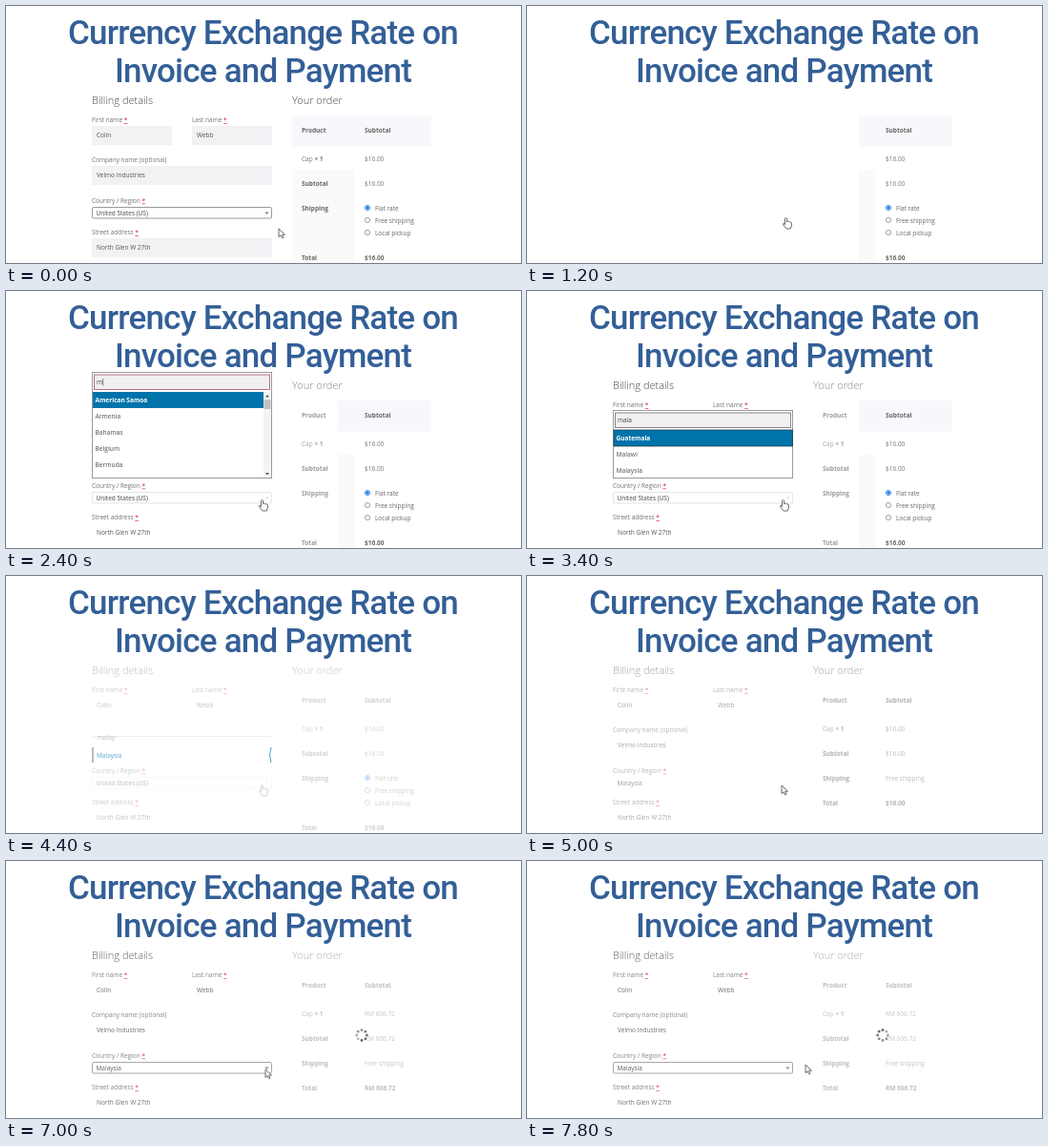
Write an HTML page that moves like this. It is 540 px wide and 270 px high and loops after 8000 ms.

```html
<!DOCTYPE html>
<html lang="en">
<head>
<meta charset="utf-8">
<title>Currency Exchange Rate on Invoice and Payment</title>
<style>
html, body { margin: 0; height: 100%; overflow: hidden; background: #fff; }
svg { display: block; width: 540px; height: 270px; font: 6.5px "Open Sans", "Noto Sans", sans-serif; }
.title { font: 500 35px Roboto, sans-serif; letter-spacing: -.8px; fill: #335f97; text-anchor: middle; }
.head { font-size: 11px; font-weight: 300; }
</style>
</head>
<body>
<svg viewBox="0 0 540 270">
  <g id="scene"></g>
  <text class="title" x="269.5" y="39.5">Currency Exchange Rate on</text>
  <text class="title" x="269.5" y="80">Invoice and Payment</text>
</svg>
<script>
const LOOP = 8000, STEP = 200;
const scene = document.getElementById('scene');

const text = (x, y, s, fill = '#555', more = '') =>
  `<text x="${x}" y="${y}" fill="${fill}" ${more}>${s}</text>`;
const rect = (x, y, w, h, fill, more = '') =>
  `<rect x="${x}" y="${y}" width="${w}" height="${h}" fill="${fill}" ${more}/>`;
const group = (opacity, s) => opacity ? `<g opacity="${opacity}">${s}</g>` : '';
const bold = 'font-weight="700"';
const required = ' <tspan fill="#d22" text-decoration="underline">*</tspan>';

// Each entry overrides the defaults from its time on.
const base = {
  form: 1, fill: 0, edge: 0.25, country: 'United States (US)',
  order: 1, names: 1, shade: 348, local: false, price: '$16.00',
  list: null, busy: false, hand: true, x: 265, y: 219
};
const search = (top, query, rows, mark = 0) => ({ top, query, rows, mark });
const open = { names: 0.65 };
const single = search(160, 'malay', ['Malaysia']);
const faint = { form: 0.35, order: 0.3, shade: 0, edge: 0.2, list: { ...single, ghost: true } };
const chosen = { form: 0.5, order: 0.5, shade: 0, edge: 0, country: 'Malaysia', local: true, hand: false, x: 267, y: 220 };
const loading = { ...chosen, form: 0.85, edge: 1, order: 0.42, price: 'RM 606.72', busy: true };
const timeline = [
  [0, { fill: 1, edge: 1, shade: 300, hand: false, x: 286, y: 234 }],
  [1000, { form: 0, names: 0, hand: false, x: 279, y: 230 }],
  [1200, { form: 0, names: 0, x: 268, y: 222 }],
  [1400, { form: 0, names: 0, x: 265, y: 219 }],
  [1600, { ...open, list: search(86, '', ['United Arab Emirates', 'United Kingdom (UK)', 'United States (US)', 'Uruguay', 'Uzbekistan'], 2) }],
  [2400, { ...open, list: search(86, 'm', ['American Samoa', 'Armenia', 'Bahamas', 'Belgium', 'Bermuda']) }],
  [2600, { ...open, list: search(86, 'ma', ['Bahamas', 'Cayman Islands', 'Denmark', 'Germany', 'Guatemala']) }],
  [3000, { ...open, list: search(86, 'mal', ['Guatemala', 'Malawi', 'Malaysia', 'Maldives', 'Mali']) }],
  [3200, { ...open, list: search(126, 'mala', ['Guatemala', 'Malawi', 'Malaysia']) }],
  [3600, { ...open, list: single }],
  [4000, faint],
  [4600, { ...chosen, form: 0.4, order: 0.35, local: false }],
  [4800, chosen],
  [6000, { ...chosen, form: 0.6 }],
  [7000, loading]
];

function field(x, y, w, label, value, fill, must = true) {
  return text(x, y, label + (must ? required : ''), '#707070') +
    (fill ? rect(x, y + 4, w, 20, '#f2f2f5') : '') +
    text(x + 5, y + 16, value);
}

function form(s) {
  return text(90, 103, 'Billing details', '#444', 'class="head"') +
    field(90, 122, 84, 'First name', 'Colin', s.fill) +
    field(195, 122, 84, 'Last name', 'Webb', s.fill) +
    field(90, 164, 189, 'Company name (optional)', 'Velmo Industries', s.fill, false) +
    text(90, 206.5, 'Country / Region' + required, '#707070') +
    group(s.edge, rect(90.5, 211.5, 188, 11.5, 'none', 'stroke="#999" rx="1"') +
      '<path d="M271.5 216.5h4l-2 2.6z" fill="#777"/>') +
    text(94.5, 219.8, s.country, '#444') +
    field(90, 240, 189, 'Street address', 'North Glen W 27th', s.fill);
}

function shading(left) {
  return rect(left, 115, 446 - left, 32.5, '#f8f8fc') +
    rect(left, 172, 366 - left, 98, '#fafafb');
}

function shipping(local) {
  if (local) return text(376, 214.5, 'Free shipping', '#777');
  return ['Flat rate', 'Free shipping', 'Local pickup'].map((name, i) => {
    const y = 212 + 13 * i;
    return text(387, y + 2.6, name, '#666') +
      `<circle cx="379" cy="${y}" r="2.6" fill="#fff" stroke="${i ? '#888' : '#1877e8'}" stroke-width=".8"/>` +
      (i ? '' : `<circle cx="379" cy="${y}" r="1.7" fill="#1877e8"/>`);
  }).join('');
}

function order(s) {
  const end = s.local ? 240.5 : 267;
  const names = text(300, 103, 'Your order', '#444', 'class="head"') +
    text(310, 133, 'Product', '#666', bold) +
    text(310, 162.5, 'Cap <tspan font-weight="700"> × 1</tspan>', '#777') +
    text(310, 188.5, 'Subtotal', '#666', bold) +
    text(310, 214.5, 'Shipping', '#666', bold) +
    text(310, end, 'Total', '#666', bold);
  return group(s.names, names) +
    text(376, 133, 'Subtotal', '#666', bold) +
    text(376, 162.5, s.price, '#777') +
    text(376, 188.5, s.price, '#777') +
    shipping(s.local) +
    text(376, end, s.price, '#666', bold);
}

function dropdown({ top, query, rows, mark, ghost }) {
  if (ghost) {
    return rect(90, 158, 189, 39, '#fff') +
      '<path d="M91 168.5h187" stroke="#eee"/>' +
      text(96, 172, query, '#bbb') + text(95, 190.5, rows[0], '#5ba9d2') +
      '<path d="M91 180v16" stroke="#777"/><path d="M278 180q-3 8 0 16" fill="none" stroke="#4aa0cc"/>';
  }
  const long = rows.length > 4;
  const caret = 95.5 + [...query].reduce((w, c) => w + (c === 'm' ? 6 : c === 'l' ? 1.7 : 3.5), 0);
  let out = rect(90.5, top - .5, 188, 197 - top, '#fff', 'stroke="#999"') +
    rect(92.5, top + 2, 184, 15.5, '#f0f0f0', `stroke="${long ? '#b9707e' : '#888'}"`) +
    text(95, top + 12, query, '#444') +
    (long ? rect(caret, top + 6, .6, 7.5, '#333') : '');
  rows.forEach((name, i) => {
    const y = top + 20 + 17 * i, on = i === mark;
    if (on) out += rect(91, y, long ? 179 : 187.5, 17, '#0073aa', long ? '' : 'stroke="#243b48" stroke-width=".8"');
    out += text(93.5, y + 10.8, name, on ? '#fff' : '#777', `font-weight="${on ? 700 : 600}"`);
  });
  if (long) {
    out += rect(270, top + 20, 8, 90, '#f3f3f3') + rect(270.5, top + 28, 7, 10, '#c1c1c1') +
      `<path d="M272 ${top + 25.5}h4l-2-2.5zM272 ${top + 105}h4l-2 2.5z" fill="#555"/>`;
  }
  return out;
}

function spinner(n) {
  let out = '';
  for (let i = 0; i < 8; i++) {
    const a = (i + n) * Math.PI / 4;
    out += `<circle cx="${373 + 5.4 * Math.cos(a)}" cy="${183 + 5.4 * Math.sin(a)}" r="1.4" fill="#555" opacity="${.45 + i * .07}"/>`;
  }
  return out;
}

function cursor({ hand, x, y }) {
  const d = hand
    ? 'M2.5 6V1.2q1-1.4 2 0V4.5q1-.8 1.8.2 1-.6 1.7.4 1-.3 1.4.7V9l-1.2 3H4L.8 8Q0 6.3 1.4 6.2L2.5 7.5z'
    : 'M0 0v8.6l2-1.8 1.5 3 1.5-.7-1.4-2.9h2.8z';
  return `<path transform="translate(${x} ${y})" d="${d}" fill="#fff" stroke="#444" stroke-width=".8"/>`;
}

function render(n) {
  const time = n * STEP;
  const s = { ...base, ...timeline.filter(([at]) => at <= time).pop()[1] };
  if (s.busy) {
    const k = (time - 6800) / 1000;
    s.x += 25 * k;
    s.y -= 6 * k;
  }
  scene.innerHTML = (s.shade ? shading(s.shade) : '') +
    group(s.form, form(s)) + group(s.order, order(s)) +
    (s.list ? dropdown(s.list) : '') +
    (s.busy ? spinner(n) : '') +
    group(s.list && s.list.ghost ? 0.3 : 1, cursor(s));
}

let shown = -1;
function tick() {
  const n = Math.floor(performance.now() % LOOP / STEP);
  if (n !== shown) render(shown = n);
  requestAnimationFrame(tick);
}
tick();
</script>
</body>
</html>
```
